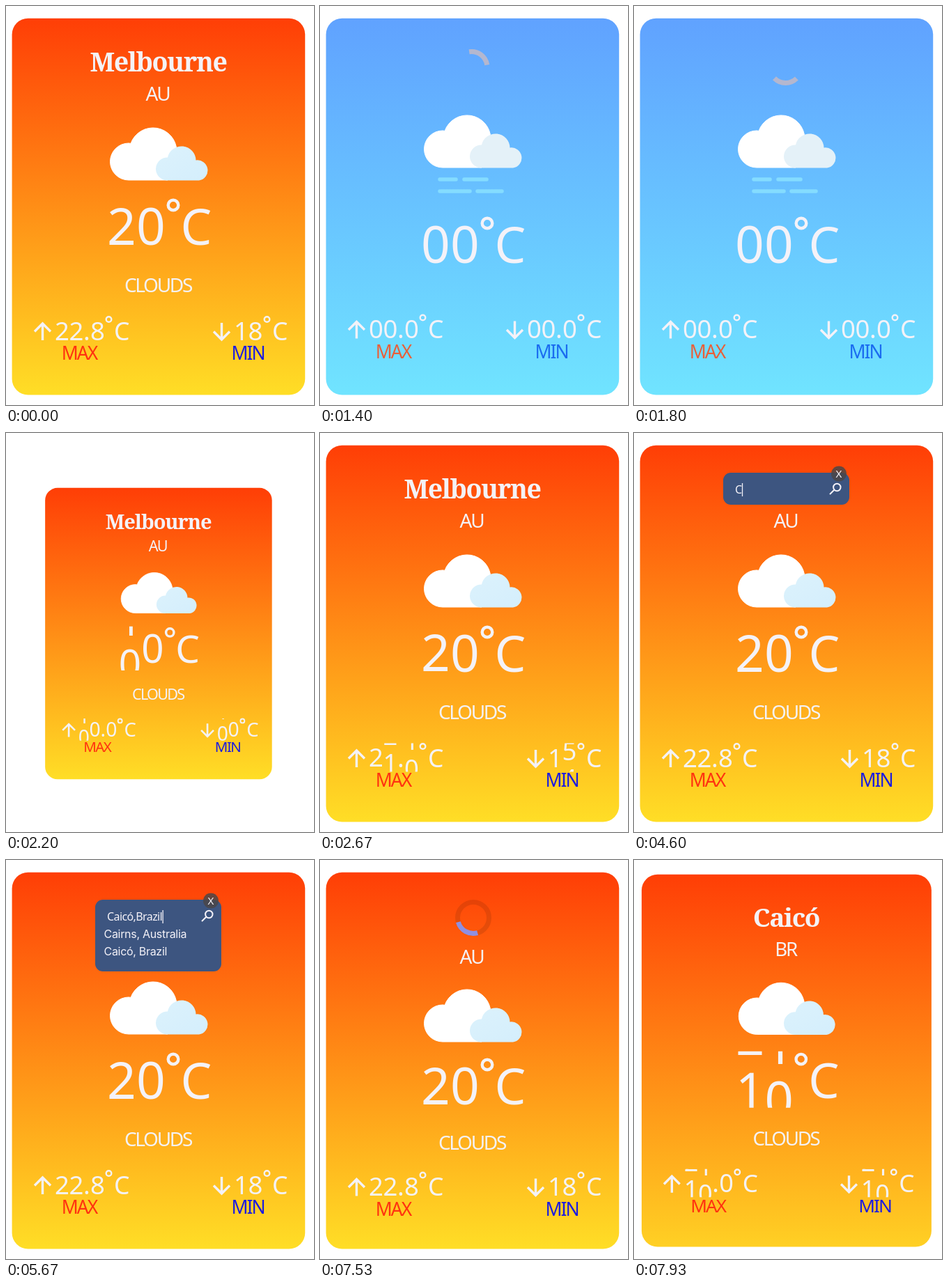
Recreate the animation shown at these times as an HTML page. Size 442 by 573 pixels, loop 8000 ms.

```html
<!DOCTYPE html>
<html lang="en">
<head>
<meta charset="utf-8">
<title>Weather card</title>
<style>
  html, body { margin: 0; width: 100%; height: 100%; overflow: hidden; background: #fff; }
  svg { display: block; }
  #stage { width: 100%; height: 100%; }
  text { font-family: "Noto Sans", "Open Sans", sans-serif; font-weight: 500; fill: #f4f2f8; }
  .mid { text-anchor: middle; }
  #title { font: 600 37.5px "Noto Serif", serif; letter-spacing: -1.4px; }
  .caps { font-size: 28px; letter-spacing: -2.3px; }
  .label { font-size: 26.5px; letter-spacing: -2px; }
  #query { font-size: 16px; letter-spacing: -.6px; }
  .item { font: 16px Inter, sans-serif; letter-spacing: -.3px; }
  .line { fill: none; stroke: #f4f2f8; }
</style>
</head>
<body>
<svg id="stage" viewBox="0 0 442 573">
  <defs>
    <linearGradient id="sky" x2="0" y2="1"><stop id="skyTop"/><stop id="skyEnd" offset="1"/></linearGradient>
    <linearGradient id="mist" x2="1" y2="1"><stop stop-color="#dcf2fc"/><stop offset="1" stop-color="#d4eefc"/></linearGradient>
  </defs>
  <g id="card">
    <rect x="8.600" y="17.800" width="420.600" height="540.600" rx="23" fill="url(#sky)"/>
    <text id="title" class="mid" x="218.500"></text>
    <g id="spinner" fill="none" stroke-width="7">
      <circle id="track" r="22.5" stroke="#000" stroke-opacity=".1"/>
      <circle id="arc" r="22.5" pathLength="4" stroke-dasharray="1 3"/>
    </g>
    <text id="country" class="mid caps" x="217.500" y="136"></text>
    <g id="icon">
      <path fill="#fff" stroke="#fff" d="M176 250a26.5 26.5 0 0 1 0-53q2 0 3 .5A34 34 0 0 1 245 208L246 235L232 250Z"/>
      <path id="smallCloud" d="M231 250.500a16.500 16.500 0 0 1 1-33A20.5 20.5 0 0 1 272.500 221.500A14.500 14.500 0 0 1 277 250.500Z"/>
      <path id="wind" d="M172 267h23M207 267h32M172 284h43M226 284h35" fill="none" stroke="#84dcff" stroke-width="5.5" stroke-linecap="round"/>
    </g>
    <g id="temp"></g>
    <text id="sort" class="mid caps" x="218" y="411">CLOUDS</text>
    <g id="row"></g>
    <g id="search">
      <rect id="panel" x="128" y="57" width="181" rx="11" fill="#3d5580"/>
      <circle cx="294" cy="58.500" r="11" fill="#4a4648" fill-opacity=".85"/>
      <text class="mid" x="294" y="64" font-size="15">X</text>
      <path class="line" stroke-width="2" d="M287 82l-6 6M296.500 78a5.200 5.200 0 1 1-10.400 0a5.200 5.200 0 1 1 10.400 0"/>
      <text id="query" x="145" y="87"></text>
      <path id="caret" class="line" stroke-width="1.300" d="M0 72v19"/>
      <g id="items">
        <text class="item" x="140.500" y="112">Cairns, Australia</text>
        <text class="item" x="140.500" y="137">Caicó, Brazil</text>
      </g>
    </g>
  </g>
  <g id="pointer">
    <path id="beam" d="M-4-9q4 0 4 3v12q0 3-4 3M4-9q-4 0-4 3M0 6q0 3 4 3M-2 1h4" fill="none" stroke="#222" stroke-width="1.200"/>
    <path id="arrow" d="M0 0v15l3.500-3 2.500 6 2.500-1-2.500-6h5z" fill="#111" stroke="#fff"/>
  </g>
</svg>
<script>
const LOOP = 8000, RELOAD = 1050, FIRST_DATA = 2025, SEARCH = 6700, SECOND_DATA = 7560;
const OPEN = 3900, PICK = 5500;
const KEYS = [[4500, 'C'], [4750, 'Ca'], [5000, 'Cai'], [PICK, 'Caicó,Brazil']];
const $ = id => document.getElementById(id);
const show = (el, on) => el.setAttribute('display', on ? 'inline' : 'none');
const move = (el, x, y) => el.setAttribute('transform', `translate(${x} ${y})`);
const clamp = v => Math.min(1, Math.max(0, v));
const smooth = v => v * v * (3 - 2 * v);

function make(parent, tag, attrs = {}, text = '') {
  const el = document.createElementNS('http://www.w3.org/2000/svg', tag);
  for (const key in attrs) el.setAttribute(key, attrs[key]);
  el.textContent = text;
  return parent.appendChild(el);
}

// A clipped strip of digits, with higher digits above lower ones.
function reel(parent, center, baseline, size) {
  const width = size * .7;
  const box = make(parent, 'svg', { x: center - width / 2, y: baseline - size * .93, width, height: size * 1.123 });
  const strip = make(box, 'g');
  for (let d = 0; d < 10; d++)
    make(strip, 'text', { class: 'mid', x: width / 2, y: size * (.93 - 1.08 * d), 'font-size': size }, d);
  return value => move(strip, 0, value * size * 1.08);
}

function degrees(parent, ringX, ringY, r, stroke, x, y, size) {
  make(parent, 'circle', { class: 'line', cx: ringX, cy: ringY, r, 'stroke-width': stroke });
  make(parent, 'text', { x, y, 'font-size': size }, 'C');
}

function smallTemp(x, arrowPath, label) {
  const group = make($('row'), 'g', { transform: `translate(${x} 0)` });
  const front = make(group, 'g'), tail = make(group, 'g');
  make(front, 'path', { class: 'line', 'stroke-width': 3.4, d: arrowPath });
  const reels = [reel(front, 80.5, 479.5, 36.5), reel(front, 101, 479.5, 36.5), reel(tail, 131.5, 479.5, 36.5)];
  make(tail, 'text', { class: 'mid', x: 116, y: 479.5, 'font-size': 36.5 }, '.');
  degrees(group, 147.5, 450, 3.8, 2.4, 155, 479.5, 35.5);
  const name = make(group, 'text', { class: 'mid label', x: 105, y: 508 }, label);
  return { front, tail, reels, name };
}

const mainReels = [reel($('temp'), 166, 342.5, 73), reel($('temp'), 208, 342.5, 73)];
degrees($('temp'), 240, 286, 7.3, 4.4, 250.5, 342.5, 71);
const max = smallTemp(0, 'M52.5 480V457M41 467.5L52.5 456L64 467.5', 'MAX');
const min = smallTemp(227, 'M52.5 455V478M41 467.5L52.5 479L64 467.5', 'MIN');

const MELBOURNE = { title: 'Melbourne', country: 'AU', main: [2, 0], max: [2, 2, 8], min: [1, 8], end: '#ffde26' };
const CAICO = { title: 'Caicó', country: 'BR', main: [2, 7], max: [2, 7, 4], min: [2, 7], end: '#ffd024' };
const EMPTY = { title: '', country: '', main: [0, 0], max: [0, 0, 0], min: [0, 0, 0] };

// Vertical shifts caused by the height of the heading.
const SHIFTS = {
  ready: { icon: 0, country: 0, temp: 0, sort: 0, row: 0 },
  blank: { icon: -18, country: 0, temp: 26, sort: 0, row: -2.5 },
  loading: { icon: 11, country: 12.5, temp: 8, sort: 5, row: 2.5 }
};

function roll(reels, digits, age) {
  digits.forEach((digit, i) => reels[i](digit * smooth(clamp((age - 280 * i) / 650))));
}

function pointerAt(t) {
  const p = smooth(clamp((t - 3100) / 350));
  return { x: 225 - 25 * p, y: -20 + 93 * p, visible: t >= 3100 && t < KEYS[0][0] };
}

function drawCard(t, hovered) {
  const blank = t >= RELOAD && t < FIRST_DATA;
  const loading = t >= SEARCH && t < SECOND_DATA;
  const data = blank ? EMPTY : t < SECOND_DATA ? MELBOURNE : CAICO;
  const age = t < RELOAD ? LOOP : t - (t < SECOND_DATA ? FIRST_DATA : SECOND_DATA);
  const searching = t >= OPEN && t < SEARCH;

  const scale = blank ? 1 : 1 - (1 - clamp(age / 520)) ** 3.6;
  $('card').setAttribute('transform', `translate(219 288) scale(${scale}) translate(-219 -288)`);
  $('skyTop').setAttribute('stop-color', blank ? '#60a2ff' : '#ff3e06');
  $('skyEnd').setAttribute('stop-color', blank ? '#70e4ff' : data.end);

  const shifts = SHIFTS[blank ? 'blank' : loading ? 'loading' : 'ready'];
  for (const id in shifts) move($(id), 0, shifts[id]);
  $('title').textContent = data.title;
  $('title').setAttribute('y', hovered ? 91.5 : 94);
  $('country').textContent = data.country;
  show($('title'), !searching && !loading);
  show($('sort'), !blank);
  show($('wind'), blank);
  $('smallCloud').setAttribute('fill', blank ? '#e4f1f8' : 'url(#mist)');

  roll(mainReels, data.main, age);
  roll(max.reels, data.max, age);
  roll(min.reels, data.min, age);
  const whole = data.min.length === 2;
  move(min.front, whole ? 30 : 0, 0);
  move(min.name, whole ? 15 : 0, 0);
  show(min.tail, !whole);
  max.name.style.fill = blank ? '#e8603a' : '#ff3210';
  min.name.style.fill = blank ? '#1b6cf0' : '#1c1ce0';

  show($('spinner'), blank || loading);
  show($('track'), loading);
  move($('spinner'), blank ? 217.5 : 220, blank ? 88 : 83);
  const turn = (t - (blank ? RELOAD : SEARCH)) * .36;
  $('arc').setAttribute('transform', `rotate(${turn + 135})`);
  $('arc').setAttribute('stroke', blank ? '#b4b7cf' : '#8f8fe0');

  show($('search'), searching);
  if (searching) drawSearch(t);
}

function drawSearch(t) {
  const key = KEYS.filter(([time]) => t >= time).pop();
  const listed = t >= KEYS[2][0];
  $('query').textContent = key ? key[1] : '';
  $('panel').setAttribute('height', listed ? 103 : 46);
  show($('items'), listed);
  move($('caret'), 146 + (key ? $('query').getComputedTextLength() : 0), 0);
}

function drawPointer({ x, y, visible }, overText) {
  show($('pointer'), visible);
  move($('pointer'), x, y);
  show($('beam'), overText);
  show($('arrow'), !overText);
}

function frame() {
  const t = performance.now() % LOOP;
  const pointer = pointerAt(t);
  const overText = pointer.visible && pointer.y > 58;
  drawCard(t, overText);
  drawPointer(pointer, overText);
  requestAnimationFrame(frame);
}
frame();
</script>
</body>
</html>
```
